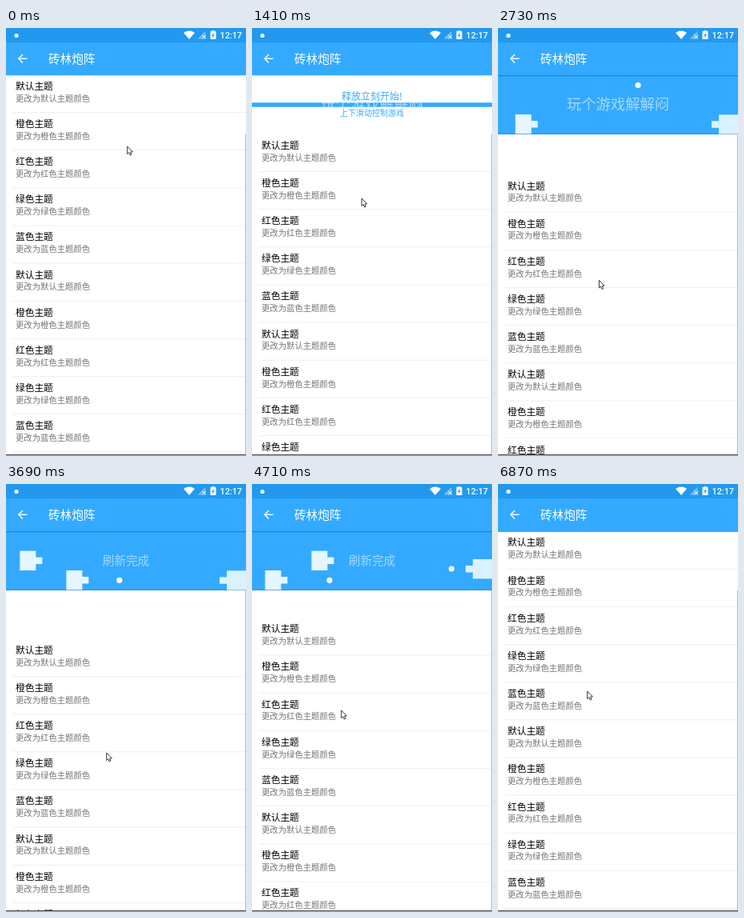
Write an HTML page with a canvas that moves like this. It is 300 by 535 pixels and loops after 6.9 s.

```html
<!DOCTYPE html>
<html lang="zh-CN">
<head>
<meta charset="utf-8">
<style>
  html, body { margin: 0; width: 100%; height: 100%; overflow: hidden; background: #fff; }
  canvas { display: block; width: 300px; height: 535px; }
</style>
</head>
<body>
<canvas id="stage"></canvas>
<script>
const LOOP = 6900, TOP = 59, PANEL = 74;
const RELEASE = 970, OPEN = 1250, START = 1842, DONE = 3000, CLOSE = 6550;
const BLUE = '#33aaff', STATUS = '#2299ee';
const CJK = '"Noto Sans CJK SC", "Noto Sans CJK JP", "Noto Sans CJK", sans-serif';
const stage = document.getElementById('stage');
const c = stage.getContext('2d');
const ratio = window.devicePixelRatio || 1;
stage.width = 300 * ratio;
stage.height = 535 * ratio;

const clamp = (v, a, b) => Math.min(b, Math.max(a, v));
const span = (t, a, b) => clamp((t - a) / (b - a), 0, 1);
const slowDown = p => 1 - (1 - p) * (1 - p);
const glide = (t, a, b) => {
  const p = span(t, a, b);
  return p * p * (3 - 2 * p);
};

// Motion of the hand; the list follows it
const pointerX = t => 151 - 22 * span(t, 0, 2130) - 4 * glide(t, 2250, 2900) - 14 * glide(t, 3720, 4500);
const pointerY = t => 147 - 69 * glide(t, 0, 330) + 134 * glide(t, 330, RELEASE)
  + 123 * glide(t, 2250, 2900) - 53 * glide(t, 3720, 4500) - 24 * glide(t, 5430, 5600);
const pulled = y => 2.5 * PANEL * (1 - 100 ** (-(y - 78) / 952));

function offset(t) {
  if (t < 330) return 0;
  const pull = pulled(pointerY(Math.min(t, RELEASE)));
  const settled = pull + (PANEL - pull) * slowDown(span(t, RELEASE, RELEASE + 200));
  const drag = Math.max(0, pointerY(t) - 213) / 2;
  return (settled + drag) * (1 - slowDown(span(t, CLOSE, LOOP)));
}

function rect(x, y, w, h, fill) {
  c.fillStyle = fill;
  c.fillRect(x, y, w, h);
}

function text(s, x, middle, size, fill, align = 'left', weight = 400, family = CJK) {
  c.font = `${weight} ${size}px ${family}`;
  c.textAlign = align;
  c.fillStyle = fill;
  c.fillText(s, x, middle + size * 0.37);
}

function path(points, { fill, stroke, width = 1 }) {
  c.beginPath();
  points.forEach(([x, y]) => c.lineTo(x, y));
  if (fill) { c.closePath(); c.fillStyle = fill; c.fill(); }
  if (stroke) { c.strokeStyle = stroke; c.lineWidth = width; c.stroke(); }
}

function dot(x, y, r) {
  c.beginPath();
  c.arc(x, y, r, 0, Math.PI * 2);
  c.fillStyle = '#fff';
  c.fill();
}

// Game: tanks roll in from the left, the player fires at a steady rate
const ROW = 24.4, TANK_SPEED = 0.0559, SHOT_SPEED = 0.1935, MUZZLE = 267;
const gunY = t => 0.5 + clamp(offset(t) - PANEL, 0, 2 * ROW);

const enemies = Array.from({ length: 5 }, (_, n) => ({ row: 2 - n % 2, born: START + 1038 * n, hit: Infinity }));
const shots = Array.from({ length: 6 }, (_, n) => {
  const fired = 2256 + 788 * n, y = gunY(fired) + 12;
  const target = enemies.find(e => e.row === Math.floor(y / ROW) && e.hit === Infinity);
  const hit = target
    ? (MUZZLE + 8 + SHOT_SPEED * fired + TANK_SPEED * target.born) / (SHOT_SPEED + TANK_SPEED)
    : Infinity;
  if (target) target.hit = hit;
  return { fired, y, hit };
});

function game(t) {
  rect(0, 0, 300, PANEL, BLUE);
  const done = t >= DONE;
  text(done ? '刷新完成' : '玩个游戏解解闷', 150, 36.5, done ? 14.6 : 18.3, '#a8d9ff', 'center');

  if (t >= START) {
    for (const { row, born, hit } of enemies) {
      if (t >= hit) continue;
      const x = TANK_SPEED * (t - born) - 28, y = 0.2 + ROW * row;
      rect(x, y, 20, ROW, '#e6f6ff');
      rect(x + 19.5, y + 8, 8.5, 8.5, '#e6f6ff');
    }
    const y = gunY(t);
    rect(276, y, 24, ROW, '#d9f2ff');
    rect(MUZZLE, y + 8, 9.5, 8.5, '#d9f2ff');
    for (const { fired, y, hit } of shots) {
      if (t >= fired && t < hit) dot(MUZZLE - SHOT_SPEED * (t - fired), y, 3.6);
    }
  }
  rect(0, 0, 300, 1, 'rgba(0,70,140,.25)');
  rect(0, PANEL - 1, 300, 1, 'rgba(0,70,140,.2)');
  curtain(t);
}

// Two white halves part to reveal the field
function curtain(t) {
  const half = PANEL / 2, d = half * span(t, OPEN, START) ** 2;
  if (d >= half) return;
  c.save();
  c.beginPath();
  c.rect(0, 0, 300, PANEL);
  c.clip();
  rect(0, -d, 300, half, '#fff');
  rect(0, half + d, 300, half, '#fff');
  text('释放立刻开始!', 150, 29 - d, 12, BLUE, 'center');
  text('上下滑动控制游戏', 150, 44.5 + d, 10, BLUE, 'center');
  c.restore();
}

function list(off) {
  const themes = ['默认', '橙色', '红色', '绿色', '蓝色'];
  for (let i = 0; i < 10; i++) {
    const y = off + i * 47.15, name = themes[i % 5] + '主题';
    text(name, 12, y + 72.5, 11.7, '#000', 'left', 500);
    text(`更改为${name}颜色`, 12, y + 87.8, 10.35, '#757575');
    rect(8, y + 105, 292, 1, '#f0f0f0');
  }
}

function bars() {
  rect(0, 0, 300, 18, STATUS);
  rect(0, 18, 300, TOP - 18, BLUE);
  rect(0, TOP, 300, 1, 'rgba(0,0,0,.1)');
  rect(0, TOP + 1, 300, 1, 'rgba(0,0,0,.04)');
  dot(13, 9.5, 2.6);

  // Wifi, no signal, battery, clock
  c.beginPath();
  c.moveTo(229, 14);
  c.lineTo(222, 6);
  c.quadraticCurveTo(229, 1.2, 236, 6);
  c.fillStyle = '#fff';
  c.fill();
  path([[239.5, 13.5], [249.5, 13.5], [249.5, 3.5]], { fill: 'rgba(255,255,255,.35)' });
  path([[245.5, 9], [250, 13.5]], { stroke: '#fff' });
  path([[250, 9], [245.5, 13.5]], { stroke: '#fff' });
  rect(257.3, 3, 3.4, 2, '#fff');
  rect(255.5, 4, 7, 10, '#fff');
  path([[260, 5.5], [257, 9.7], [258.8, 9.7], [258, 12.7], [261, 8.5], [259.2, 8.5]], { fill: STATUS });
  text('12:17', 295, 9.3, 10.8, '#fff', 'right', 500, 'Roboto, sans-serif');

  path([[26.5, 38.3], [16, 38.3]], { stroke: '#fff', width: 1.4 });
  path([[21, 33.1], [15.8, 38.3], [21, 43.5]], { stroke: '#fff', width: 1.4 });
  text('砖林炮阵', 53, 38.3, 14.6, '#fff');
}

function pointer(x, y) {
  c.save();
  c.translate(x + 0.7, y + 1);
  path([[0, 0], [0, 9.5], [2, 7.6], [3.6, 11], [5.2, 10.2], [3.8, 7], [6.6, 6.8]],
    { fill: '#fff', stroke: '#333' });
  c.restore();
}

function draw(t) {
  const off = offset(t);
  c.setTransform(ratio, 0, 0, ratio, 0, 0);
  rect(0, 0, 300, 535, '#fff');
  const shift = t < OPEN ? off - PANEL : Math.min(0, off - PANEL);
  c.save();
  c.translate(0, TOP + shift);
  game(t);
  c.restore();
  list(off);
  bars();
  rect(0, 533, 300, 1, '#444');
  rect(0, 534, 300, 1, '#bbb');
  rect(299, TOP + PANEL, 1, 400, '#bbb');
  pointer(pointerX(t), pointerY(t));
}

const start = performance.now();
function tick() {
  draw((performance.now() - start) % LOOP);
  requestAnimationFrame(tick);
}
tick();
</script>
</body>
</html>
```
